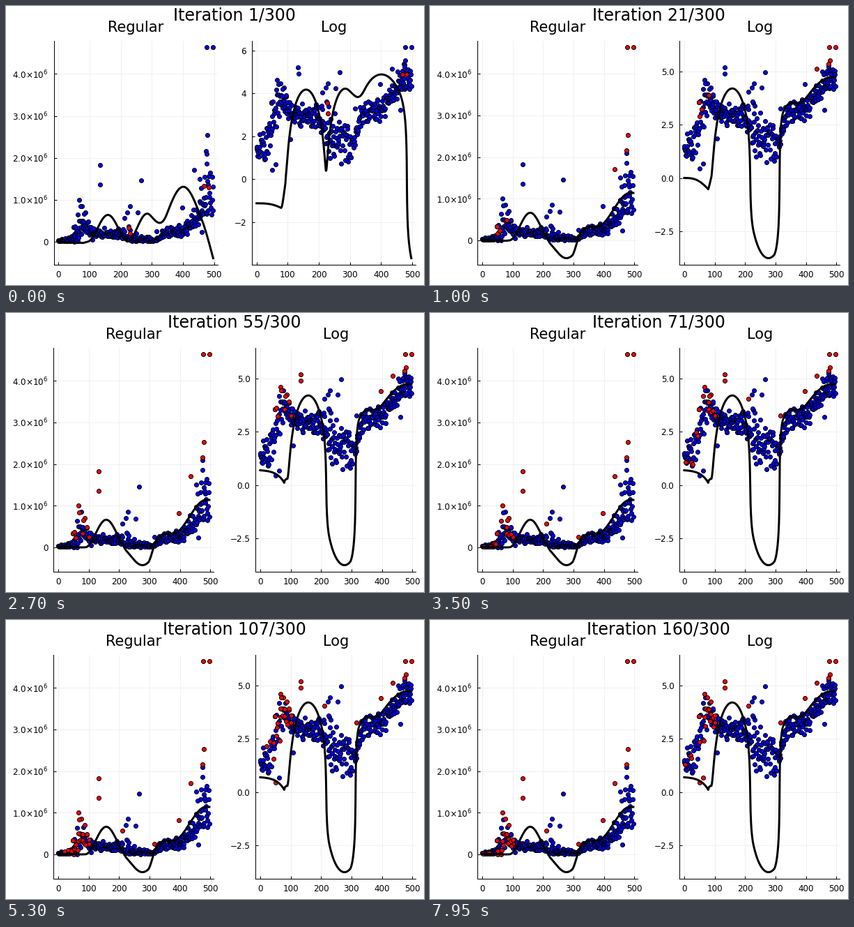
Write a matplotlib script that moves like this. It is 600 px wide and 400 px high and loops after 8000 ms.

```python
import numpy as np
import matplotlib.pyplot as plt
from matplotlib.animation import FuncAnimation

W, H, DPI = 600, 400, 100
PX = 72 / DPI            # points per pixel
FRAMES, INTERVAL = 160, 50
TOP, BOTTOM = 50.4, 370.6
UNIT = 1e4
END = 497

plt.rcParams["font.family"] = "DejaVu Sans"
rng = np.random.default_rng(7)


def signed_log(v):
    return np.sign(v) * np.log1p(np.abs(v))


def step(x, a, b):
    """Eased rise from 0 at a to 1 at b."""
    t = np.clip((x - a) / (b - a), 0, 1)
    return t * t * (3 - 2 * t)


def hump(x, center, half):
    """Cosine bump of height 1 that ends at center +- half."""
    t = np.clip((x - center) / half, -1, 1)
    return np.cos(t * np.pi / 2) ** 2


# fitted curve, in units of 10^4: first guess and settled fit
cx = np.linspace(0, END, 1491)
head_part = np.clip((94 - cx) / 13, 0, 1)
dip = (np.minimum(cx, 79) / 79) ** 3 * np.clip((88 - cx) / 9, 0, 1)
guess = (-2.1 * head_part - 0.75 * dip + 64 * hump(cx, 159, 67)
         + 67 * hump(cx, 285, 64) + 131 * hump(cx, 401, 106)
         - 42 * (np.maximum(cx - 460, 0) / 37) ** 2)
fit = (-0.7 * dip + 66.5 * hump(cx, 158, 70) - 42.5 * hump(cx, 277, 75)
       + 33 * step(cx, 295, 325) + 81 * step(cx, 378, 485))
lift = (1.0 - cx / 400) * head_part


def curve(n):
    k = step(n, 0, 10)
    return guess * (1 - k) + fit * k + lift * step(n, 20, 48)


# scattered samples: a drifting level with varying spread, on the log scale
bulk_x = np.round(np.linspace(0, END, 350))
level = (1.4 + 2.2 * step(bulk_x, 0, 80) - 0.6 * step(bulk_x, 90, 115)
         - 1.4 * step(bulk_x, 180, 290) + 1.6 * step(bulk_x, 295, 350)
         + 1.4 * step(bulk_x, 390, 480))
spread = 0.3 + 0.4 * hump(bulk_x, 45, 60) + 0.5 * hump(bulk_x, 250, 75)
noise = np.clip(rng.normal(size=bulk_x.size), -1.7, 1.7)
bulk_y = np.maximum(level + spread * noise, 0.69)

# samples that stand out, as x and log value
FLAGGED = [(477, 6.14), (497, 6.14), (478, 5.54), (474, 5.38), (436, 5.15),
           (87, 4.26), (48, 3.57), (100, 3.28), (66, 4.62), (133, 5.21),
           (134, 4.92), (397, 4.42), (316, 3.28), (211, 4.05)]
EARLY = [(226, 3.54), (229, 3.05), (468, 4.9), (483, 4.87)]
PLAIN = [(475, 5.35), (475, 5.23), (453, 5.02), (266, 4.99), (229, 4.46),
         (222, 4.26), (254, 4.25), (76, 4.46), (50, 0.43), (62, 0.69),
         (461, 3.21), (108, 1.87)]

px, py = np.array(FLAGGED + EARLY + PLAIN).T
nf, ne = len(FLAGGED), len(EARLY)
x = np.concatenate([px, bulk_x])
y = np.concatenate([py, bulk_y])
v = np.expm1(y)

# the far end is flagged at once, the rest one after another
start = np.where(x[:nf] > 430, 14, np.linspace(10, 62, nf))

# near the left hump flags come and go, mostly on high values
swarm = ((x > 18) & (x < 102)) | ((x > 212) & (x < 220) & (y < 2.5))
chance = np.where(swarm, np.where(y > 3.2, 0.4, 0.12), 0)
chance[x < 6] = 0.03
HOLD = 5
phase = rng.integers(0, HOLD, x.size)
dice = rng.random((x.size, FRAMES // HOLD + 2))


def flags(n):
    growth = 0.4 * step(n, 10, 20) + 0.6 * step(n, 50, 85)
    red = dice[np.arange(x.size), (n + phase) // HOLD] < chance * growth
    red[:nf] = start <= n
    red[nf:nf + ne] = n < 8
    return red


# figure
fig = plt.figure(figsize=(W / DPI, H / DPI), dpi=DPI, facecolor="white")
head = fig.text(328 / W, 1 - 20.5 / H, "", ha="center", va="baseline",
                fontsize=23.67 * PX)


def make_panel(title):
    ax = fig.add_axes([0.1, 0.1, 0.3, 0.8])
    ax.set_title(title, fontsize=21 * PX, pad=13 * PX)
    ax.spines[["top", "right"]].set_visible(False)
    ax.spines[["left", "bottom"]].set_linewidth(PX)
    ax.set_axisbelow(True)
    ax.grid(color="#f0f0f0", lw=PX)
    ax.tick_params(direction="in", length=4 * PX, width=PX, pad=8 * PX,
                   labelsize=12 * PX)
    ax.set_xlim(-0.03 * END, 1.03 * END)
    ax.set_xticks(range(0, 501, 100))
    style = dict(ls="", marker="o", ms=6 * PX, mec="black", mew=PX)
    blue, = ax.plot([], [], mfc="blue", zorder=3, **style)
    red, = ax.plot([], [], mfc="red", zorder=4, **style)
    line, = ax.plot([], [], color="black", lw=3 * PX, zorder=5)
    return ax, blue, red, line


regular = make_panel("Regular")
logarithm = make_panel("Log")
regular[0].set_yticks([k * 1e6 for k in range(5)],
                      ["0"] + [rf"${k}.0{{\times}}10^6$" for k in range(1, 5)])


def fill(panel, pts, path, red):
    ax, blue_dots, red_dots, line = panel
    blue_dots.set_data(x[~red], pts[~red])
    red_dots.set_data(x[red], pts[red])
    line.set_data(cx, path)
    lo, hi = min(path.min(), pts.min()), max(path.max(), pts.max())
    pad = 0.03 * (hi - lo)
    ax.set_ylim(lo - pad, hi + pad)


def place(panel, left, right):
    panel[0].set_position([left / W, 1 - BOTTOM / H, (right - left) / W,
                           (BOTTOM - TOP) / H])


def log_ticks(values, digits):
    labels = [f"{t:.{digits}f}".replace("-", "\u2212") for t in values]
    logarithm[0].set_yticks(values, labels)


def draw(n):
    head.set_text(f"Iteration {n + 1}/300")
    c = curve(n)
    path = signed_log(c)
    red = flags(n)
    # a deeper trough asks for wider tick labels
    if path.min() < -3.72:
        place(regular, 68.4, 298.4)
        place(logarithm, 358.4, 588.4)
        log_ticks([-2.5, 0, 2.5, 5], 1)
    else:
        place(regular, 68.6, 304)
        place(logarithm, 353, 588.4)
        log_ticks([-2, 0, 2, 4, 6], 0)
    fill(regular, v * UNIT, c * UNIT, red)
    fill(logarithm, y, path, red)
    return []


anim = FuncAnimation(fig, draw, frames=FRAMES, interval=INTERVAL,
                     init_func=lambda: [], repeat=True, repeat_delay=0)
plt.show()
```
